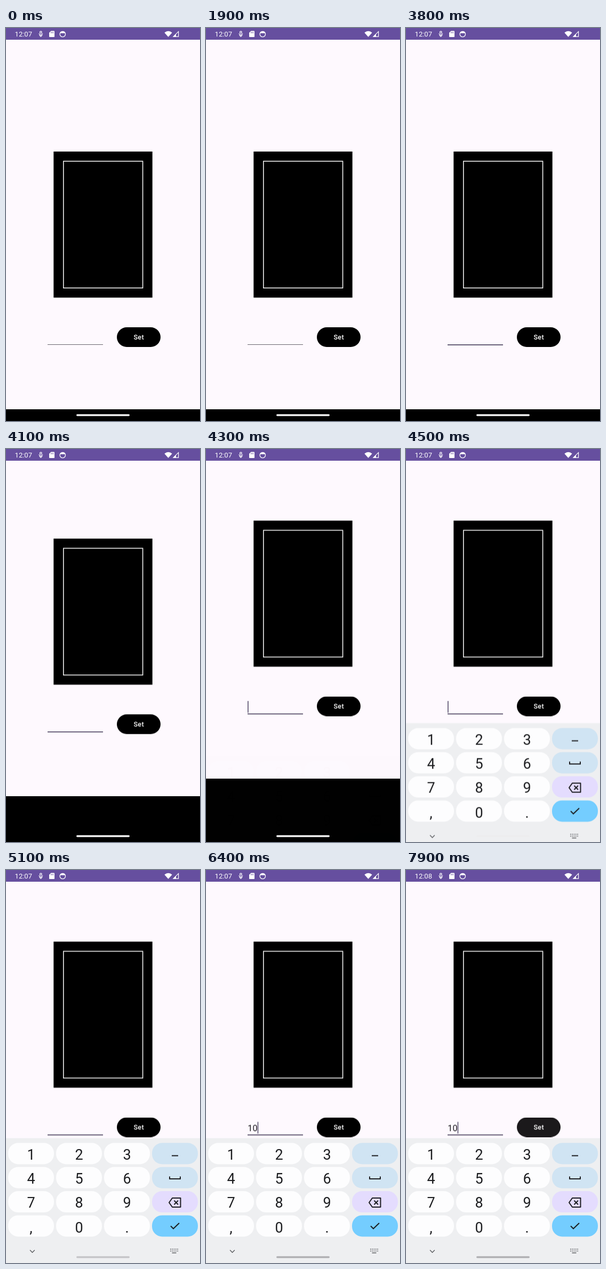
Animation, 364 px wide and 738 px high, one loop 8 s. Source, as an HTML page:

```html
<!DOCTYPE html>
<html lang="en">
<head>
<meta charset="utf-8">
<title>Card screen</title>
<style>
  html, body { margin: 0; width: 100%; height: 100%; overflow: hidden; background: #000; }
  svg { display: block; width: 364px; height: 738px; font-family: Roboto, sans-serif; }
  .page, .board, .pill { animation: 8s linear infinite; }
  .page { animation-name: pan; }
  .board { animation-name: rise, fade; }
  .pill { animation-name: dim; }
  .step { animation: 8s step-end infinite; }
  .line { animation-name: focus; }
  .caret { animation-name: blink, advance; }
  .one { animation-name: one; }
  .zero { animation-name: zero; }
  .before { animation-name: before; }
  .after { animation-name: after; }
  .btn { animation-name: press; }

  @keyframes pan {
    0% { transform: none; }
    50% { transform: none; animation-timing-function: cubic-bezier(.5, 1, .89, 1); }
    53.06%, 100% { transform: translateY(-97.5px); }
  }
  @keyframes rise {
    0% { transform: translateY(73px); }
    55% { transform: translateY(73px); animation-timing-function: cubic-bezier(0, 0, .2, 1); }
    57.5%, 100% { transform: none; }
  }
  @keyframes fade { 0%, 53.75% { opacity: 0; } 55.625%, 100% { opacity: 1; } }
  @keyframes dim {
    0%, 55% { fill: #f4f4f4; }
    63.5% { fill: #c6c6c9; }
    71.25%, 100% { fill: #b0b0b3; }
  }
  @keyframes focus {
    0% { height: 1px; fill: #67636c; }
    36.5%, 100% { height: 2px; fill: #675f78; }
  }
  @keyframes blink {
    0% { opacity: 0; }
    42% { opacity: 1; }
    47% { opacity: 0; }
    53.3% { opacity: 1; }
    60.8% { opacity: 0; }
    65.8% { opacity: 1; }
    73.3% { opacity: 0; }
    77% { opacity: 1; }
    84.5% { opacity: 0; }
    93.3%, 100% { opacity: 1; }
  }
  @keyframes advance {
    0% { transform: none; }
    77% { transform: translateX(9px); }
    79.5%, 100% { transform: translateX(18.5px); }
  }
  @keyframes one { 0% { opacity: 0; } 77%, 100% { opacity: 1; } }
  @keyframes zero { 0% { opacity: 0; } 79.5%, 100% { opacity: 1; } }
  @keyframes before { 0% { opacity: 1; } 98.4%, 100% { opacity: 0; } }
  @keyframes after { 0% { opacity: 0; } 98.4%, 100% { opacity: 1; } }
  @keyframes press { 0% { fill: #000; } 93.3%, 100% { fill: #1b191b; } }
</style>
</head>
<body>
<svg viewBox="0 0 364 738">
  <rect width="364" height="738"/>

  <g class="page">
    <rect width="364" height="716" fill="#fef9fe"/>
    <rect x="89.3" y="232" width="185.4" height="274.3"/>
    <rect x="107.8" y="250.2" width="148.8" height="238" fill="none" stroke="#fff" stroke-width="1.5"/>
    <rect class="step line" x="78" y="594" width="104" height="1" fill="#67636c"/>
    <g font-size="16" fill="#1d1b20">
      <text class="step one" x="78.3" y="588">1</text>
      <text class="step zero" x="87.4" y="588">0</text>
    </g>
    <rect class="step caret" x="78" y="570.5" width="1.7" height="22" fill="#5f5673"/>
    <rect class="step btn" x="208" y="562" width="82" height="37" rx="18.5"/>
    <text x="249.2" y="585.2" text-anchor="middle" font-size="12.6" font-weight="500" letter-spacing=".3" fill="#fff">Set</text>
  </g>

  <rect width="364" height="22" fill="#664f9f"/>
  <g fill="#fff">
    <g font-size="13">
      <text class="step before" x="16.6" y="16">12:07</text>
      <text class="step after" x="16.6" y="16">12:08</text>
    </g>
    <g fill="none" stroke="#fff" stroke-width="1.3">
      <circle cx="65.3" cy="8" r="1.8"/>
      <path d="M61.6 10.5l3.7 3 3.7-3M62.5 13.2l2.8 2.8 2.8-2.8"/>
      <circle cx="106.3" cy="11.5" r="5.2"/>
    </g>
    <path d="M84.5 5.5H90a1 1 0 0 1 1 1V16a1 1 0 0 1-1 1H82a1 1 0 0 1-1-1V9z"/>
    <path d="M101.5 9.8a5 5 0 0 1 9.6 0z"/>
    <path d="M84.5 7.5v2.2M86.6 7.5v2.2M88.7 7.5v2.2" stroke="#664f9f"/>
    <path d="M297.3 8.8q7.2-6 14.4 0l-7.2 8z"/>
    <path d="M323.6 6.6v9.6h-9.6z" fill="none" stroke="#fff" stroke-width="1.2"/>
    <path d="M319 11v5.5h-5.5z"/>
  </g>

  <g class="board">
    <rect y="503.5" width="364" height="240" fill="#eeeff1"/>
    <g id="keys" font-size="27" text-anchor="middle"></g>
    <g fill="none" stroke="#1c1d20" stroke-width="2">
      <path d="M311 536.5h12"/>
      <path d="M307 575.5v4.5h20v-4.5"/>
      <path d="M312 616h15.5v17H312l-6-8.5z" stroke-linejoin="round"/>
      <path d="M315.5 620.8l7.4 7.4m0-7.4l-7.4 7.4"/>
      <path d="M309 668.5l5 5 11-10.5"/>
    </g>
    <g fill="none" stroke="#5b5d61" stroke-width="1.5">
      <path d="M45 713.8l4.4 4.4 4.4-4.4"/>
      <path d="M308 712h15M308 715.5h15" stroke-dasharray="1.8 1.5"/>
      <path d="M311.5 719h8"/>
    </g>
  </g>

  <rect class="pill" x="132" y="725.2" width="100" height="3.6" rx="1.8" fill="#f4f4f4"/>
</svg>
<script>
  const keys = document.getElementById('keys');
  const side = ['#d0e4f3', '#d0e4f3', '#e4dcfe', '#74cdff'];

  function add(tag, attrs, text = '') {
    const el = document.createElementNS('http://www.w3.org/2000/svg', tag);
    for (const name in attrs) el.setAttribute(name, attrs[name]);
    el.textContent = text;
    keys.append(el);
  }

  ['123', '456', '789', ',0.'].forEach((row, r) => {
    const y = 512.5 + r * 45.3;
    for (let c = 0; c < 4; c++) {
      const x = 4 + c * 90;
      add('rect', { x, y, width: 86, height: 40, rx: 19, fill: c < 3 ? '#fdfdfe' : side[r] });
      if (c < 3) {
        add('text', { x: x + 43, y: y + (r < 3 ? 31 : 33), fill: '#1c1d20' }, row[c]);
      }
    }
  });
</script>
</body>
</html>
```
